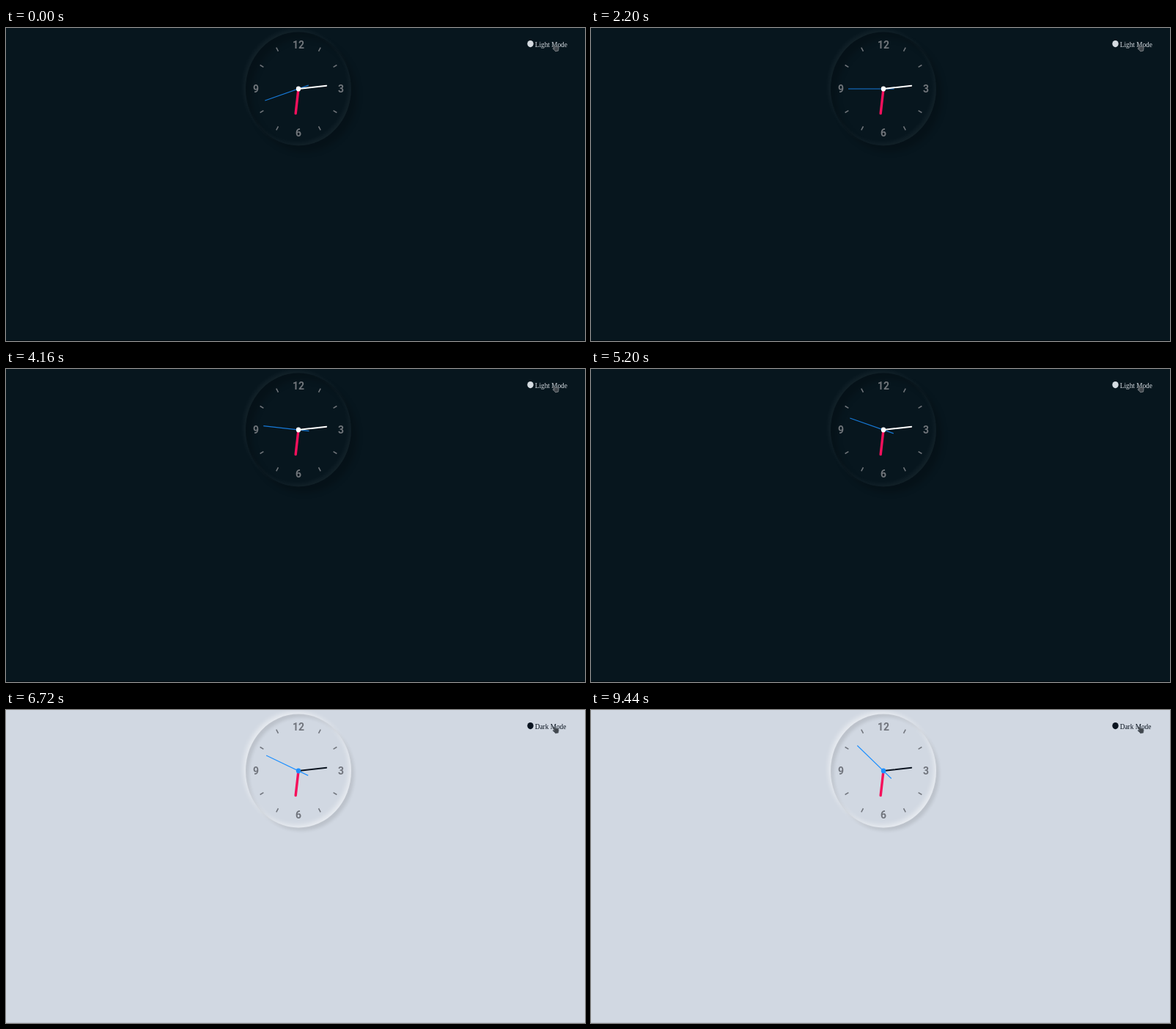
Recreate the animation shown at these times as an HTML page. Size 790 by 427 pixels, loop 10000 ms.

```html
<!DOCTYPE html>
<html lang="en">
<head>
<meta charset="utf-8">
<title>Clock</title>
<style>
  html, body { margin: 0; width: 100%; height: 100%; overflow: hidden; }
  body {
    --bg: #07161e; --ink: #d5dbe1; --minute: #fff; --dot: #fff; --second: #1679d8;
    --edge: #030b10; --glow: rgba(255,255,255,.05); --shade: 8px 8px 8px rgba(0,0,0,.2);
    --digit: #70757a; --cursor: #8d9296;
    position: relative; background: var(--bg);
  }
  body.light {
    --bg: #d1d8e2; --ink: #0a1420; --minute: #0b1420; --dot: #1e90ff; --second: #1e90ff;
    --edge: #bec5cf; --glow: rgba(255,255,255,.5); --shade: 4px 4px 4px rgba(0,0,0,.1);
    --digit: #71757d; --cursor: #59606a;
  }
  #face {
    position: absolute; left: 327px; top: 10.5px; width: 144px; height: 144px;
    border-radius: 50%; transform: scaleY(1.076);
    box-shadow: -3px -3px 6px var(--glow), var(--shade),
      inset -3px -3px 6px var(--glow), inset var(--shade);
  }
  svg { position: absolute; left: 0; top: 0; }
  .digits { font: 600 14px Roboto, sans-serif; fill: var(--digit); text-anchor: middle; }
  #ticks { stroke: var(--digit); stroke-width: 1.5; }
  #label { font: 9.3px "Liberation Serif", serif; }
</style>
</head>
<body>
<div id="face"></div>
<svg width="790" height="427">
  <rect y="426" width="790" height="1" fill="var(--edge)"/>
  <g class="digits">
    <text x="399" y="28">12</text>
    <text x="457" y="88">3</text>
    <text x="399" y="148">6</text>
    <text x="341" y="88">9</text>
  </g>
  <g transform="translate(399 83) scale(1 1.076)">
    <g id="ticks"></g>
    <path id="second" d="M0 14.5V-48" stroke="var(--second)" stroke-width="1.1"/>
    <path d="M0 0V-31.3" transform="rotate(187)" stroke="#f5105c" stroke-width="3.4" stroke-linecap="round"/>
    <path d="M0 0V-38.5" transform="rotate(84)" stroke="var(--minute)" stroke-width="1.8" stroke-linecap="round"/>
    <circle r="3.2" fill="var(--dot)"/>
  </g>
  <g fill="var(--ink)">
    <ellipse cx="715.5" cy="21.6" rx="4.2" ry="4.6"/>
    <text id="label" transform="translate(721.8 26.3) scale(1 1.076)"></text>
  </g>
  <path d="M746.6 23.2q1-.7 1.7.4l1 2 .5-.4 1 .1.5-.3 1 .2.4.1.9.7.5 2.3-.5 1.5.1 1.2-4 .9-.8-1.2-2.8-2.4q0-1.2 1.4-.6l.8.3-1.8-3.8z"
    fill="#41474d" stroke="var(--cursor)" stroke-width=".8"/>
</svg>
<script>
  const LOOP = 10000, LIGHT_AT = 6720, FIRST_SECOND = 42;
  const beats = [200, 1200, 2200, 3160, 4200, 5160, 6200, 7160, 8160, 9160];
  const $ = id => document.getElementById(id);

  for (let hour = 1; hour < 12; hour++) {
    if (hour % 3) {
      $('ticks').innerHTML += `<path d="M0-55V-60.5" transform="rotate(${hour * 30})"/>`;
    }
  }

  function draw() {
    const time = performance.now() % LOOP;
    const light = time >= LIGHT_AT;
    const second = FIRST_SECOND + beats.filter(beat => time >= beat).length;
    document.body.classList.toggle('light', light);
    $('label').textContent = light ? 'Dark Mode' : 'Light Mode';
    $('second').setAttribute('transform', `rotate(${second * 6})`);
    requestAnimationFrame(draw);
  }
  draw();
</script>
</body>
</html>
```
